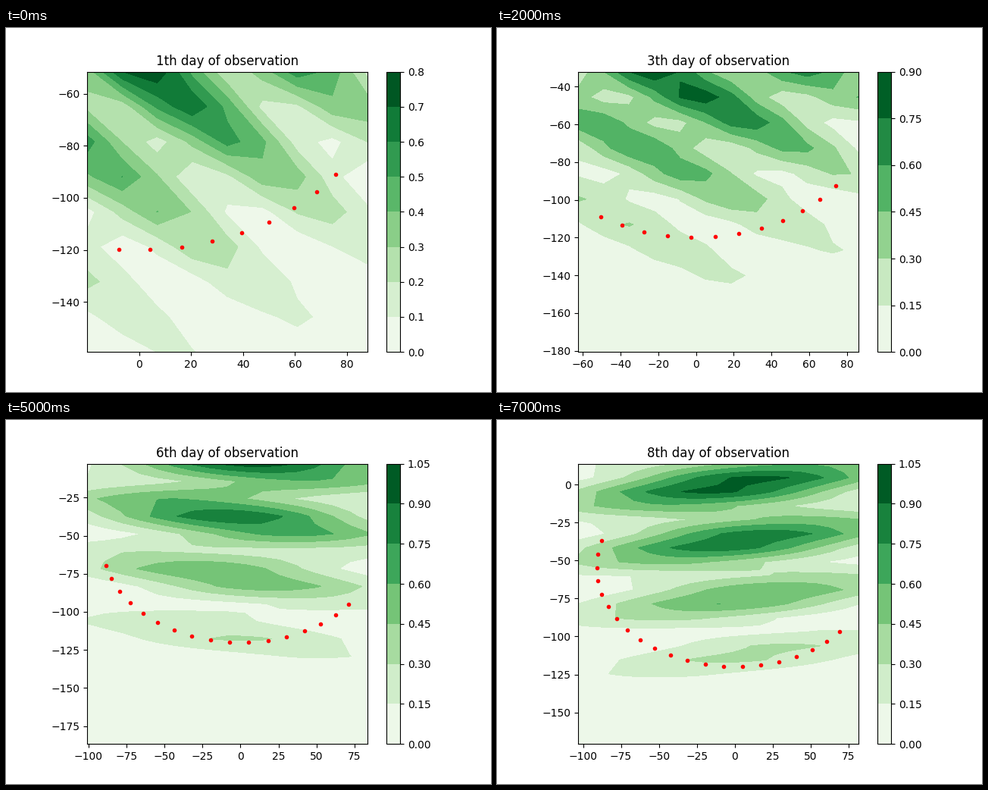
A matplotlib script for the animation above (8 s loop, 640 px wide and 480 px high).

```python
import math

import numpy as np
import matplotlib.pyplot as plt
from matplotlib.animation import FuncAnimation

# Track of sampled points: an ellipse in the (u, v) plane
SEMI_U, SEMI_V, MID_V = 91.0, 65.6, -54.4
MARGIN = 12.15
SAMPLES = [9, 10, 12, 14, 16, 17, 19, 21]

# Separation of the two sources per day, in cycles per unit of u and v
SEP_U = [0.0156, 0.0138, 0.0113, 0.0086, 0.0058, 0.0030, 0.0001, -0.0028]
SEP_V = [0.0203, 0.0216, 0.0226, 0.0236, 0.0245, 0.0255, 0.0259, 0.0263]
FLUX_DISC, FLUX_POINT = 0.8, 0.2
DISC_SCALE = 20500.0


def track(day):
    angle = np.radians(np.linspace(33.75 + 0.96 * day, 94.9 + 14.34 * day,
                                   SAMPLES[day]))
    return SEMI_U * np.cos(angle), MID_V - SEMI_V * np.sin(angle)


def disc(r2):
    """Uniform disc response, 2 J1(x) / x, as a power series."""
    z = 2 * r2 / DISC_SCALE
    return sum((-z) ** k / (math.factorial(k) * math.factorial(k + 1))
               for k in range(16))


def power(u, v, day):
    """Squared visibility of a disc with a point companion."""
    main = FLUX_DISC * disc(u ** 2 + v ** 2)
    phase = 2 * np.pi * (SEP_U[day] * u + SEP_V[day] * v)
    return (main ** 2 + FLUX_POINT ** 2
            + 2 * main * FLUX_POINT * np.cos(phase))


def levels_for(day):
    if day == 0:
        return np.linspace(0, 0.8, 9)
    if day < 5:
        return np.linspace(0, 0.9, 7)
    return np.linspace(0, 1.05, 8)


def draw(day):
    fig.clf()
    ax = fig.add_subplot()
    u, v = track(day)
    mid_u, mid_v = (u.min() + u.max()) / 2, (v.min() + v.max()) / 2
    half = max(np.ptp(u), np.ptp(v)) / 2 + MARGIN
    side = np.linspace(-half, half, SAMPLES[day])
    grid_u, grid_v = np.meshgrid(mid_u + side, mid_v + side)

    levels = levels_for(day)
    values = np.clip(power(grid_u, grid_v, day), 0, levels[-1])
    filled = ax.contourf(grid_u, grid_v, values, levels=levels, cmap="Greens")
    ax.plot(u, v, "r.")
    ax.set_xlim(mid_u - half, mid_u + half)
    ax.set_ylim(mid_v - half, mid_v + half)
    ax.set_aspect("equal")
    ax.set_title(f"{day + 1}th day of observation")
    fig.colorbar(filled, ax=ax)
    return []


fig = plt.figure(figsize=(6.4, 4.8), dpi=100)
anim = FuncAnimation(fig, draw, frames=8, interval=1000, repeat=True,
                     repeat_delay=0, blit=False)
plt.show()
```
